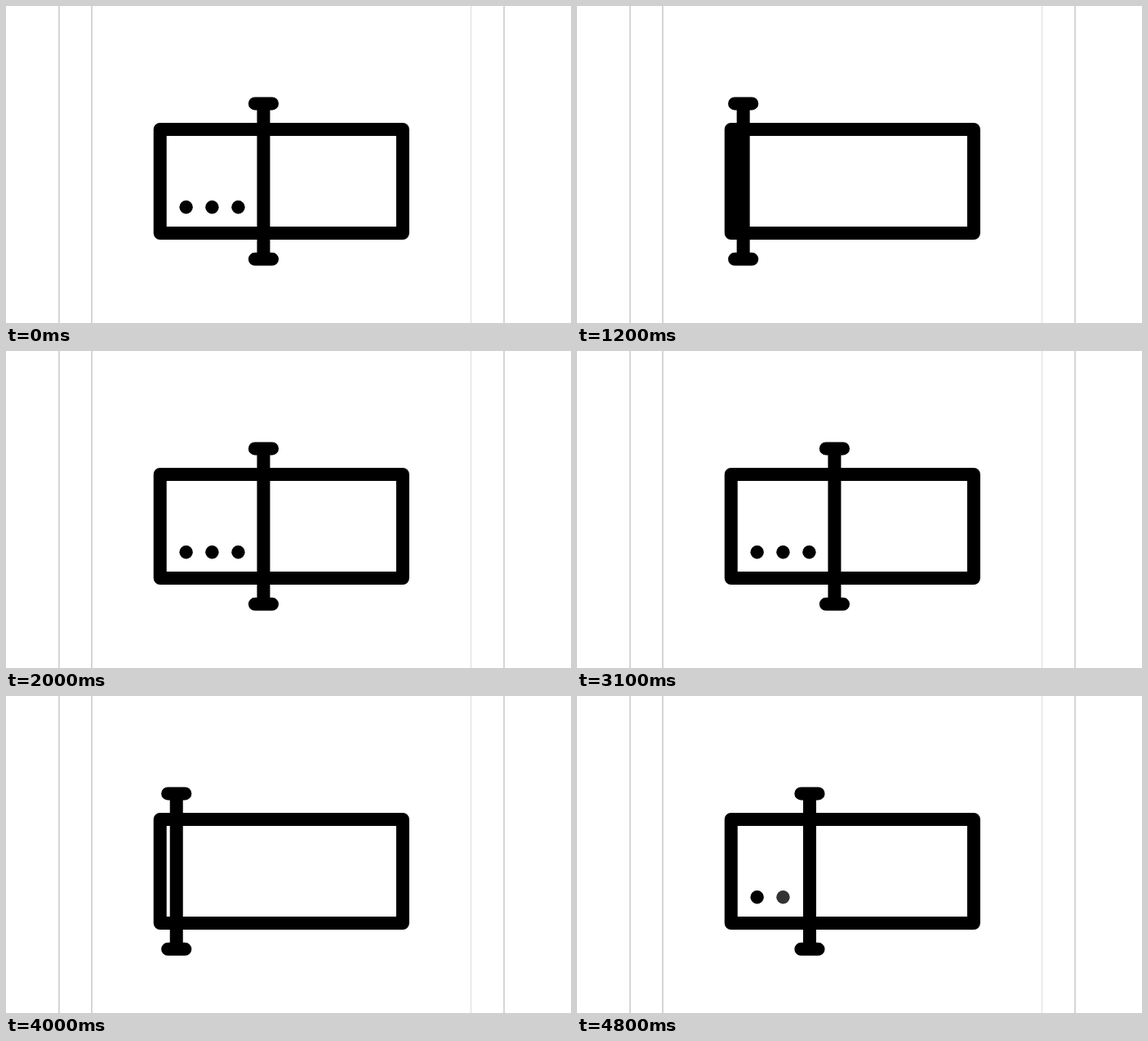
An HTML page without scripts for the animation above (4.9 s loop, 692 px wide and 388 px high).

```html
<!DOCTYPE html>
<html lang="en">
<head>
<meta charset="utf-8">
<title>Text field cursor</title>
<style>
  /* --u: cursor position, 0 = left border, 25 = resting place */
  @property --u {
    syntax: "<number>";
    inherits: true;
    initial-value: 25;
  }

  html, body {
    margin: 0;
    width: 100%;
    height: 100%;
    overflow: hidden;
    background: #fff;
  }

  svg {
    display: block;
    width: 692px;
    height: 388px;
    animation: type 4.9s infinite;
  }

  .field, .cursor {
    fill: none;
    stroke: #000;
    stroke-width: 16;
    stroke-linejoin: round;
    stroke-linecap: round;
  }

  .cursor { transform: translateX(calc(188.4px + var(--u) * 5.08px)); }

  /* each dot fades over five units of cursor travel */
  .dot { opacity: clamp(0, (var(--u) - var(--from)) / 5, 1); }

  /* ten steps a second; the second pass runs slightly unevenly */
  @keyframes type {
    0%       { --u: 25; animation-timing-function: step-end; }
    6.1224%  { --u: 24; animation-timing-function: steps(8); }
    22.4489% { --u: 0;  animation-timing-function: steps(8); }
    38.7755% { --u: 24; animation-timing-function: step-end; }
    40.8163% { --u: 25; animation-timing-function: step-end; }
    67.3469% { --u: 24; animation-timing-function: steps(3); }
    73.4693% { --u: 15; animation-timing-function: steps(4); }
    81.6326% { --u: 4;  animation-timing-function: step-end; }
    83.6734% { --u: 1;  animation-timing-function: step-end; }
    85.7142% { --u: 3;  animation-timing-function: steps(6); }
    97.9591% { --u: 19; animation-timing-function: step-end; }
    100%     { --u: 19; }
  }
</style>
</head>
<body>
<svg viewBox="0 0 692 388">
  <g class="guides" fill="#d6d6d6">
    <rect x="64" width="2" height="388"/>
    <rect x="104" width="2" height="388"/>
    <rect x="569" width="1" height="388" fill="#dcdcdc"/>
    <rect x="609" width="2" height="388"/>
  </g>
  <rect class="field" x="188.7" y="151" width="297.2" height="127"/>
  <circle class="dot" style="--from: 10" cx="220.6" cy="246.2" r="8.2"/>
  <circle class="dot" style="--from: 15" cx="252.4" cy="246.2" r="8.2"/>
  <circle class="dot" style="--from: 20" cx="284.4" cy="246.2" r="8.2"/>
  <path class="cursor" d="M-10.6 119.4H10.6M0 119.4V309.8M-10.6 309.8H10.6"/>
</svg>
</body>
</html>
```
